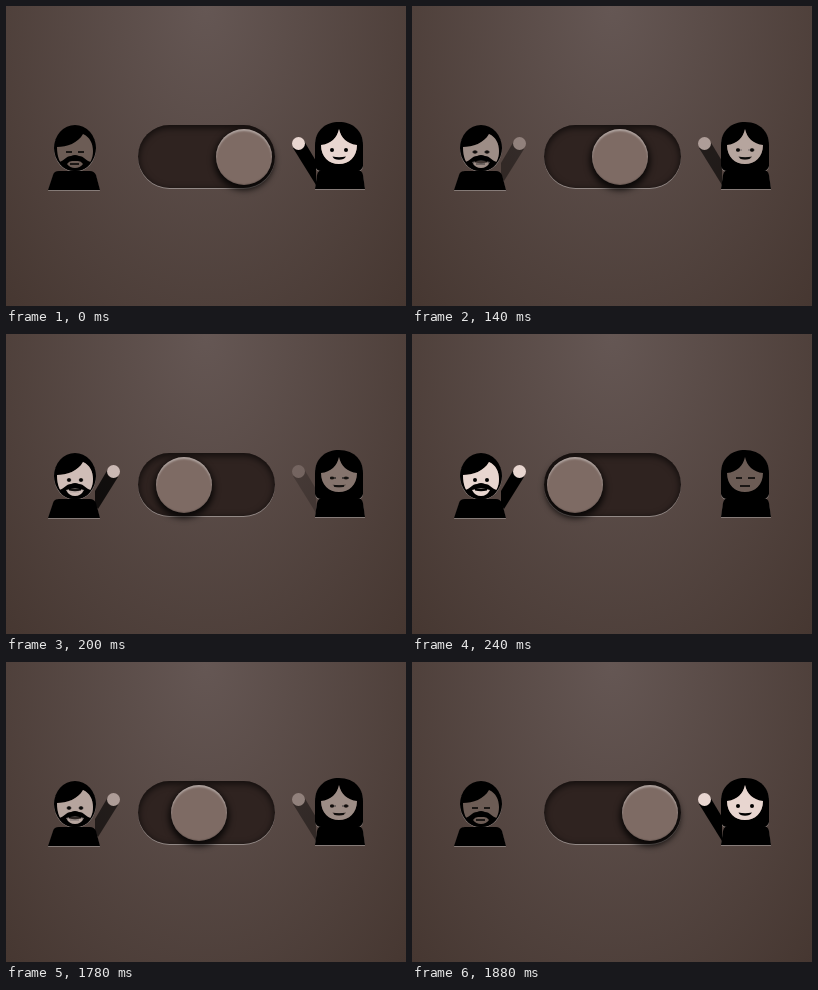
An HTML page for the animation above (3380 ms loop, 400 by 300 pixels).

```html
<!DOCTYPE html>
<html lang="en">
<head>
<meta charset="utf-8">
<title>Toggle</title>
<style>
  html, body { margin: 0; width: 100%; height: 100%; overflow: hidden; }
  body {
    position: relative;
    background: radial-gradient(ellipse farthest-corner at 50% 0, #655754, #463731);
  }
  svg { position: absolute; left: 0; top: 0; }
  .figure { filter: drop-shadow(0 1px 0 rgba(255, 255, 255, .3)); }
  .asleep { fill: #6c5c55; }
  .awake { fill: #e8d6d0; }
  .ink { fill: #000; }
  .line { stroke: #000; stroke-width: 1.6; fill: none; }
  .track, .knob { position: absolute; box-sizing: border-box; }
  .track {
    left: 132px; top: 119px; width: 137px; height: 63px; border-radius: 32px;
    background: #2f2320;
    box-shadow: inset 0 2px 6px 1px rgba(0, 0, 0, .6), 0 1px 0 rgba(255, 255, 255, .35);
  }
  .knob {
    left: 135px; top: 123px; width: 56px; height: 56px; border-radius: 50%;
    background: #7e6b64;
    box-shadow: inset 0 2px 2px rgba(255, 255, 255, .38), inset 0 -1px 1px rgba(0, 0, 0, .15),
      0 3px 6px 2px rgba(0, 0, 0, .8);
  }
</style>
</head>
<body>
<svg width="400" height="300" viewBox="0 0 400 300">
  <defs>
    <path id="manFace" d="M51 141C61 141 72 137 77 128C84 131 87 138 87 145C87 153 84 158 79 161L59 161C54 158 51 151 51 141Z"/>
    <path id="beard" d="M53 156C58 155 60 150 65 150Q69 148 73 150C78 150 80 155 85 156C82 162 76 165 69 165S56 162 53 156Z"/>
    <path id="womanFace" d="M333 123C331 132 325 138 315 139C315 151 323 158 333 158S351 151 351 139C341 138 335 132 333 123Z"/>
  </defs>

  <g class="figure">
    <ellipse cx="69" cy="142" rx="21" ry="23"/>
    <path d="M42 184L47 169Q48 165 53 165H84Q88 165 90 169L94 184Z"/>
  </g>
  <g class="asleep">
    <use href="#manFace"/>
    <use href="#beard" class="ink"/>
    <path d="M61 158Q63 155 66 155H72Q75 155 77 158Q74 162 69 162T61 158Z"/>
    <path class="line" d="M60 146h6M72 146h6M64 158h9"/>
  </g>
  <g id="man" class="awake">
    <path class="ink" d="M102 135L89 157V170L92 175L112 143Z"/>
    <circle cx="107.500" cy="137.500" r="6.500"/>
    <use href="#manFace"/>
    <use href="#beard" class="ink"/>
    <path d="M60 156Q69 153 78 156Q75 162 69 162T60 156Z"/>
    <path class="ink" d="M63 156.500Q69 158 75 156.500V155H63Z"/>
    <g class="ink"><circle cx="63" cy="146" r="2"/><circle cx="75" cy="146" r="2"/></g>
  </g>

  <g class="figure">
    <path d="M309 160V139C309 124 320 116 333 116S357 124 357 139V160Q356 165 350 165H316Q310 165 309 160Z"/>
    <path d="M309 183L311 169Q312 164 317 164H351Q356 164 357 169L359 183Z"/>
  </g>
  <g class="asleep">
    <use href="#womanFace"/>
    <path class="line" d="M324 144h6M336 144h7M328 152h10"/>
  </g>
  <g id="woman" class="awake">
    <path class="ink" d="M298 135L310 155V179L287 142Z"/>
    <circle cx="292.500" cy="137.500" r="6.500"/>
    <use href="#womanFace"/>
    <path class="ink" d="M326.500 150.500Q333 152 340 150.500Q338 153.800 333 153.800T326.500 150.500Z"/>
    <g class="ink"><circle cx="326" cy="144" r="2"/><circle cx="340" cy="144" r="2"/></g>
  </g>
</svg>
<div class="track"></div>
<div class="knob" id="knob"></div>

<script>
  const LOOP = 3380, TRAVEL = 75, STEP = 10, TICK = 20;
  const [knob, man, woman] = ["knob", "man", "woman"].map(id => document.getElementById(id));
  const start = performance.now();

  // Distance slid since a flip at the given time, in whole ticks
  const slide = (t, from) =>
    t < from ? 0 : Math.min(TRAVEL, STEP * (Math.floor((t - from) / TICK) + 1));

  function draw(now) {
    const t = Math.max(0, now - start) % LOOP;
    const x = TRAVEL - slide(t, 100) + slide(t, 1740);
    knob.style.transform = `translateX(${x}px)`;
    woman.style.opacity = x / TRAVEL;
    man.style.opacity = 1 - x / TRAVEL;
    requestAnimationFrame(draw);
  }
  draw(start);
</script>
</body>
</html>
```
